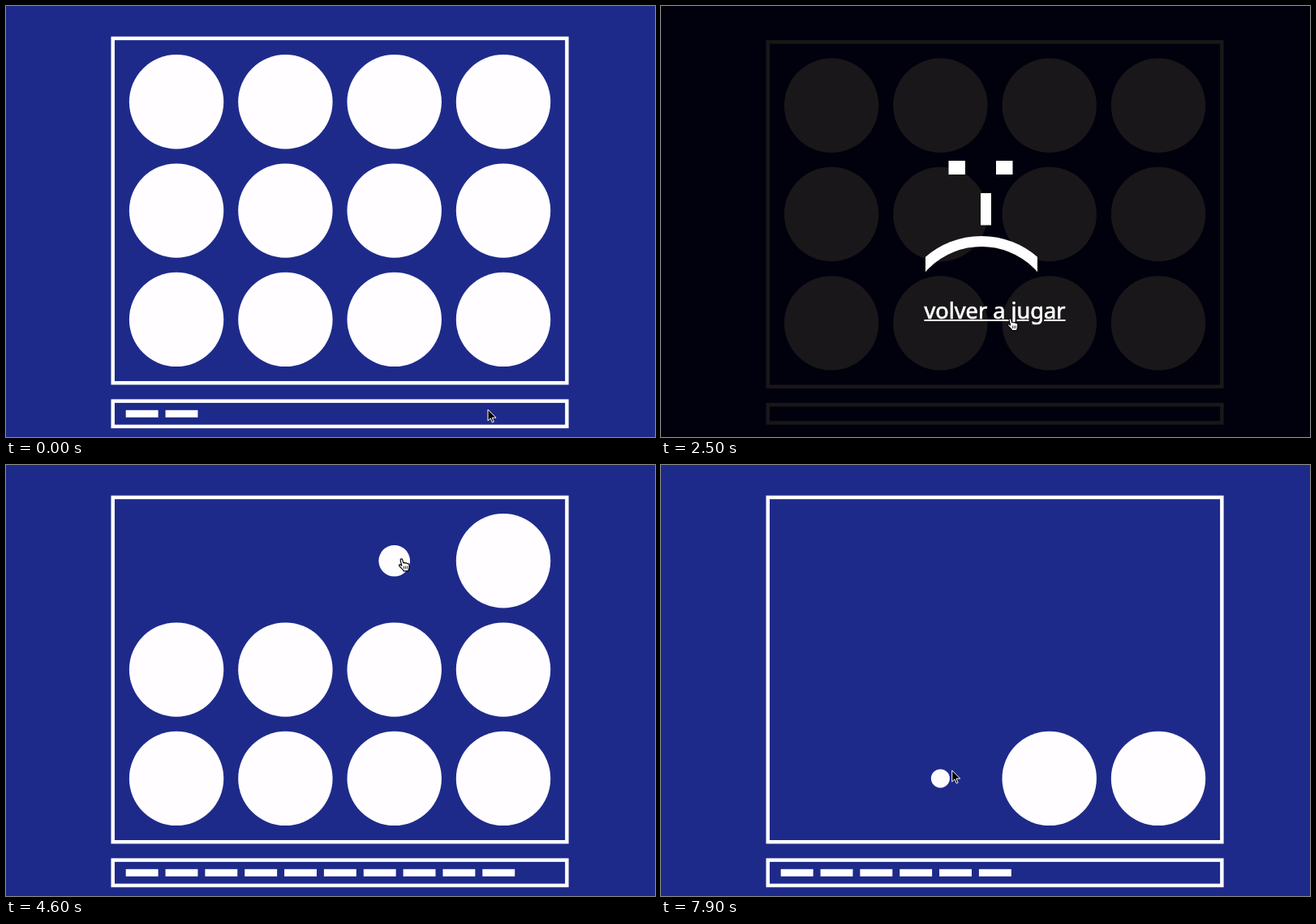
Recreate the animation shown at these times as an HTML page with a canvas. Size 800 px wide and 532 px high, loop 8 s.

```html
<!DOCTYPE html>
<html lang="es">
<head>
<meta charset="utf-8">
<title>Juego de círculos</title>
<style>
  html, body { margin: 0; width: 800px; height: 532px; overflow: hidden; background: #1e2a8a; }
  canvas { display: block; }
</style>
</head>
<body>
<canvas id="stage" width="800" height="532"></canvas>
<script>
const ctx = document.getElementById('stage').getContext('2d');

const LOOP = 8000, STEP = 100;
const GAME_OVER = 1400, RESTART = 2700, BAR_LIFE = 1000;
const SHRINK = 300;

// Everything on the board is a multiple of one layout unit.
const UNIT = 4.477;
const LEFT = 129.5, TOP = 37.7;
const RADIUS = 13 * UNIT, PITCH = 30 * UNIT;

const LIGHT = { back: '#1e2a8a', line: '#fff', disc: '#fffdff' };
const DARK = { back: '#01010d', line: '#191719', disc: '#191719' };

// Rhythm of each row, and where the pointer rests relative to a circle's centre
const rows = [
  { start: 3583, pace: 450, dx: 9, dy: -2 },
  { start: 5423, pace: 432, dx: 4, dy: -3 },
  { start: 7290, pace: 460, dx: 5, dy: -10 }
];

const centre = (col, row) => ({
  x: LEFT + 18 * UNIT + col * PITCH,
  y: TOP + 18 * UNIT + row * PITCH
});

// Rows are cleared in a snake: left to right, then back.
const popTime = (col, row) =>
  rows[row].start + rows[row].pace * (row % 2 ? 3 - col : col);

const stops = makeStops();

const ARROW = new Path2D('M0 0V14L3.2 11L5.4 16L7.4 15.1L5.2 10.2H10Z');
const HAND = new Path2D('M-1.6 .8C-1.4-.6 .6-.8 1 .6L2.2 4.6C3.2 4 4.4 4.2 4.6 5' +
  'C5.6 4.4 6.8 4.6 7 5.6C8 5.2 9.2 5.6 9.3 6.8L9.2 10.5C9 12 8.4 12.6 8.2 14.5' +
  'H2.4C1.5 12.5-1 10.8-2.8 8.4C-3.8 7-2.4 6-1 7L.1 8Z');
const KNUCKLES = new Path2D('M2.8 8.5V12M4.8 8.5V12M6.8 8.5V12');

function makeStops() {
  const list = [];
  const rest = (from, to, x, y) => list.push({ t: from, x, y }, { t: to, x, y });
  rest(0, 50, 594, 498);
  rest(450, 450, 622, 178);
  rest(1100, 1950, 523, 522);
  rest(2500, 2720, 430.5, 386);
  rows.forEach(({ dx, dy }, row) => {
    for (let i = 0; i < 4; i++) {
      const col = row % 2 ? 3 - i : i;
      const t = popTime(col, row), c = centre(col, row);
      rest(t - 180, t + 125, c.x + dx, c.y + dy);
    }
  });
  return list;
}

function pointerAt(t) {
  const i = Math.max(1, stops.findIndex(s => s.t >= t));
  const a = stops[i - 1], b = stops[i];
  const p = (t - a.t) / (b.t - a.t), k = p * p * (3 - 2 * p);
  return { x: a.x + (b.x - a.x) * k, y: a.y + (b.y - a.y) * k };
}

// CSS "ease": cubic-bezier(.25, .1, .25, 1)
function ease(p) {
  let lo = 0, hi = 1, u = 0.5;
  for (let i = 0; i < 20; i++) {
    u = (lo + hi) / 2;
    const x = 0.75 * u * (1 - u) + u ** 3;
    if (x < p) lo = u; else hi = u;
  }
  return 0.3 * u * (1 - u) ** 2 + 3 * u * u * (1 - u) + u ** 3;
}

function barsAt(t) {
  if (t < RESTART) return Math.ceil((GAME_OVER - Math.min(t, GAME_OVER)) / BAR_LIFE);
  return 11 - Math.floor((t - RESTART) / BAR_LIFE);
}

function circlesAt(t, shift) {
  const list = [];
  for (let row = 0; row < 3; row++) {
    for (let col = 0; col < 4; col++) {
      const p = Math.min(1, Math.max(0, (t - popTime(col, row)) / SHRINK));
      const { x, y } = centre(col, row);
      if (p < 1) list.push({ x, y: y + shift, r: RADIUS * (p ? 1 - ease(p) : 1) });
    }
  }
  return list;
}

function box(y, h) {
  ctx.lineWidth = UNIT;
  ctx.strokeRect(LEFT + UNIT / 2, y + UNIT / 2, 125 * UNIT, h - UNIT);
}

function drawBoard(circles, bars, shift, skin) {
  ctx.fillStyle = skin.back;
  ctx.fillRect(0, 0, 800, 532);
  ctx.strokeStyle = skin.line;
  box(TOP + shift, 96 * UNIT);
  box(TOP + 100 * UNIT + shift, (bars ? 8 : 6) * UNIT);
  ctx.fillStyle = skin.disc;
  for (const c of circles) {
    ctx.beginPath();
    ctx.arc(c.x, c.y, c.r, 0, Math.PI * 2);
    ctx.fill();
  }
  ctx.fillStyle = skin.line;
  for (let i = 0; i < bars; i++) {
    ctx.fillRect(LEFT + 4 * UNIT + i * 10.91 * UNIT + 0.3, TOP + 103 * UNIT, 8.91 * UNIT, 2 * UNIT);
  }
}

function drawFace() {
  ctx.fillStyle = ctx.strokeStyle = '#fff';
  ctx.fillRect(354.5, 191, 20.5, 17);
  ctx.fillRect(413, 191, 20.5, 17);
  ctx.fillRect(394, 231, 13, 39.5);
  ctx.save();
  ctx.beginPath();
  ctx.rect(326, 280, 138, 50);
  ctx.clip();
  ctx.beginPath();
  ctx.arc(395, 389, 98.5, Math.PI, 0);
  ctx.lineWidth = 13;
  ctx.stroke();
  ctx.restore();
}

function drawLink() {
  const label = 'volver a jugar', left = 324.5, baseline = 386;
  ctx.font = '27.2px "Noto Sans", sans-serif';
  ctx.lineWidth = 0.7;
  ctx.fillText(label, left, baseline);
  ctx.strokeText(label, left, baseline);
  // The underline leaves room for the descenders.
  let x = left;
  for (const mark of ['j', 'g']) {
    const at = label.indexOf(mark);
    const start = left + ctx.measureText(label.slice(0, at)).width;
    ctx.fillRect(x, 387, start - 2 - x, 2);
    x = start + ctx.measureText(mark).width;
  }
  ctx.fillRect(x, 387, left + ctx.measureText(label).width - x, 2);
}

function drawPointer({ x, y }, hand) {
  const shape = hand ? HAND : ARROW;
  ctx.save();
  ctx.translate(x, y);
  ctx.lineWidth = hand ? 1.2 : 1;
  ctx.lineJoin = 'round';
  ctx.fillStyle = hand ? '#fff' : '#000';
  ctx.strokeStyle = hand ? '#000' : '#fff';
  ctx.fill(shape);
  ctx.stroke(shape);
  if (hand) {
    ctx.lineWidth = 0.8;
    ctx.stroke(KNUCKLES);
  }
  ctx.restore();
}

function draw(t) {
  const over = t >= GAME_OVER && t < RESTART;
  const shift = over ? UNIT : 0;
  const circles = circlesAt(t, shift);
  const pointer = pointerAt(t);
  drawBoard(circles, barsAt(t), shift, over ? DARK : LIGHT);
  if (over) {
    drawFace();
    drawLink();
  }
  const hand = over
    ? pointer.x > 324 && pointer.x < 498 && pointer.y > 360 && pointer.y < 395
    : circles.some(c => Math.hypot(pointer.x - c.x, pointer.y - c.y) < c.r + 1);
  drawPointer(pointer, hand);
}

function tick() {
  draw(Math.floor(performance.now() % LOOP / STEP) * STEP);
  requestAnimationFrame(tick);
}
tick();
</script>
</body>
</html>
```
